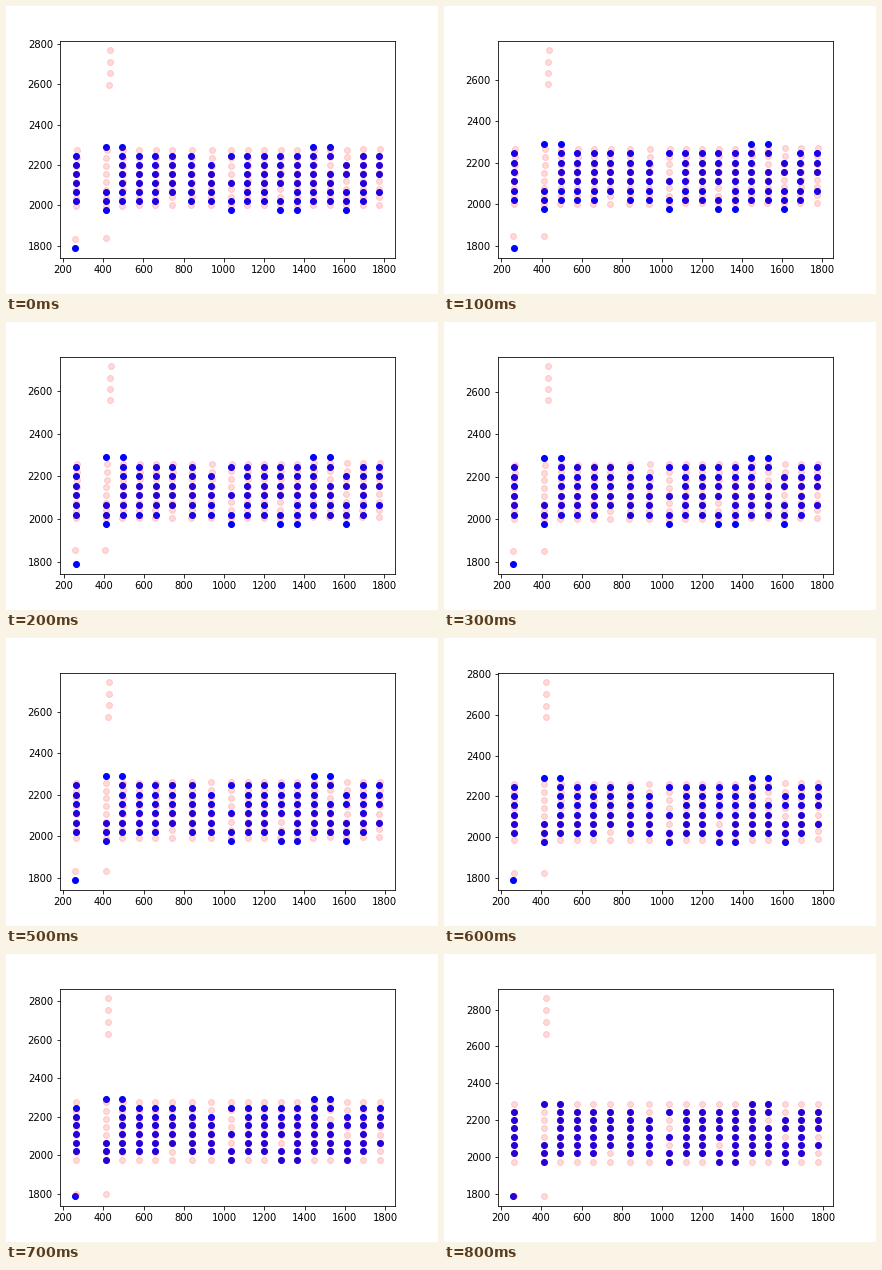
A matplotlib script that plays this animation: 432x288 px, repeating every 1.2 s.

```python
import numpy as np
import matplotlib.pyplot as plt
from matplotlib.animation import FuncAnimation

plt.rcParams["font.family"] = "DejaVu Sans"
plt.rcParams["font.size"] = 10

STEPS = 8            # steps until the fit has settled
FRAMES = 12
MID = np.array([1000, 2132.5])

# Evenly spaced table columns, with three wider gaps in the middle
k = np.arange(17)
COLUMNS = np.append(264, 413 + 82 * k + 16 * np.clip(k - 4, 0, 3))
ROWS = 2290 - 45 * np.arange(8)

# The fixed cloud fills rows 1 to 6, apart from these cells
TOP_ROW = {1, 2, 13, 14}
BOTTOM_ROW = {1, 8, 11, 12, 15}
HOLES = {1: {1, 2, 3, 4}, 5: {6}, 7: {1}, 8: {2, 3, 5},
         11: {5}, 14: {2}, 15: {1, 4}, 17: {4, 6}}

# Vertical scale and centre of the moving cloud at a few key steps
KEY_STEPS = [0, 2, 4, 6, 7, 8]
KEY_SCALES = [0.870, 0.804, 0.822, 0.874, 0.947, 1.0]
KEY_CENTRES = [2138, 2132, 2128.5, 2124, 2126.5, 2132.5]


def is_filled(col, row):
    if row == 0:
        return col in TOP_ROW
    if row == 7:
        return col in BOTTOM_ROW
    return row not in HOLES.get(col, ())


def fixed_points():
    cells = [(x, y) for c, x in enumerate(COLUMNS)
             for r, y in enumerate(ROWS) if is_filled(c, r)]
    return np.array([(260, 1788)] + cells, float)


def moving_points():
    grid = [(x, y) for x in COLUMNS for y in ROWS]
    footer = [(262, 1788), (413, 1788)]
    header = [(424, 2860 - 65 * i) for i in range(4)]
    return np.array(grid + footer + header, float)


def transform(points, step):
    """Affine pose of the moving cloud at one step of the fit."""
    scale = np.interp(step, KEY_STEPS, KEY_SCALES)
    centre = np.interp(step, KEY_STEPS, KEY_CENTRES)
    left = 1 - step / STEPS
    offset = 1.5 * left ** 2
    tilt = 0.0035 * (1 - (step / STEPS) ** 2)
    shear = 0.018 * left ** 0.2 * np.exp(-((step - 1.8) / 2.5) ** 2)

    dx, dy = (points - MID).T
    dy = scale * dy
    return MID[0] + dx + offset + shear * dy, centre + dy + tilt * dx


FIXED = fixed_points()
MOVING = moving_points()

fig, ax = plt.subplots(figsize=(6, 4), dpi=72, facecolor="white")
fig.subplots_adjust(left=0.125, right=0.9, bottom=0.125, top=0.88)


def draw(i):
    ax.clear()
    ax.scatter(*FIXED.T, color="blue")
    ax.scatter(*transform(MOVING, min(i, STEPS)), color="red", alpha=0.15)


anim = FuncAnimation(fig, draw, frames=FRAMES, interval=100,
                     init_func=lambda: None, repeat=True, repeat_delay=0)
plt.show()
```
